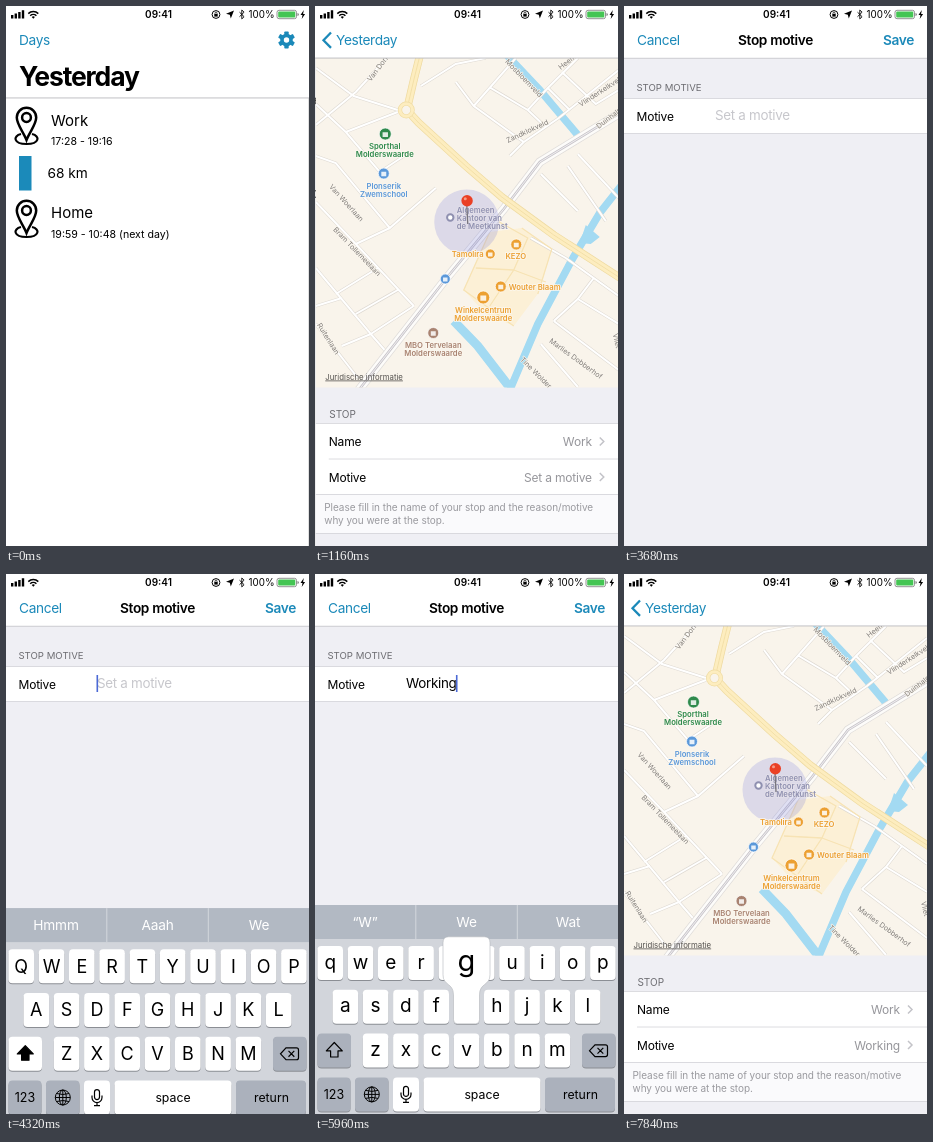
Animation, 303 px wide and 540 px high, one loop 7.88 s. Source, as an HTML page:

```html
<!DOCTYPE html>
<html lang="en">
<head>
<meta charset="utf-8">
<title>Stop motive</title>
<style>
html, body { margin: 0; width: 100%; height: 100%; overflow: hidden; background: #fff; }
svg { display: block; }
#stage { width: 100vw; height: 100vh; }
text { font-family: Inter, "Liberation Sans", sans-serif; font-optical-sizing: none; white-space: pre; }
.bar { font-size: 13.7px; letter-spacing: -.35px; fill: #1b89b9; }
.bold { font-weight: 600; }
.cell { font-size: 12px; letter-spacing: -.2px; }
.field { font-size: 13.4px; letter-spacing: -.3px; }
.head { font-size: 10px; fill: #6d6d72; }
.note { font-size: 10px; letter-spacing: -.05px; fill: #9a9a9f; }
.grey { fill: #96969b; }
.time { font-size: 10.6px; }
.poi { font-size: 7.7px; font-weight: 600; stroke: #fbf7ef; stroke-width: 1.6px; paint-order: stroke; }
.street { font-size: 7.2px; fill: #807c78; stroke: #fbf7ef; stroke-width: 1.4px; paint-order: stroke; }
.mid { text-anchor: middle; }
.end { text-anchor: end; }
</style>
</head>
<body>
<svg id="stage" viewBox="0 0 303 540">
  <rect width="303" height="540" fill="#fff"/>

  <g id="list">
    <g id="pins"></g>
    <rect x="13" y="150" width="12.5" height="34.5" fill="#1b8aba"/>
    <text x="45" y="119.5" font-size="15">Work</text>
    <text x="45" y="138.5" class="time">17:28 - 19:16</text>
    <text x="41.5" y="172" font-size="13.7">68 km</text>
    <text x="45" y="212" font-size="15">Home</text>
    <text x="45" y="231.5" class="time">19:59 - 10:48 (next day)</text>
  </g>

  <g id="detail">
    <rect x="-1" y="52" width="1" height="488" fill="#000" opacity=".12"/>
    <rect y="52" width="303" height="488" fill="#efeff4"/>
    <svg id="map" y="52" width="303" height="329.500" viewBox="0 52 303 329.500"></svg>
    <text x="13.500" y="411.500" class="head">STOP</text>
    <rect y="417" width="303" height="71.500" fill="#fff"/>
    <rect y="488.500" width="303" height="38.500" fill="#fafafc"/>
    <path d="M0 417.500H303M13 453H303M0 488.500H303M0 527.500H303" stroke="#d3d3d8" stroke-width=".8"/>
    <text x="13" y="440" class="cell">Name</text>
    <text x="13" y="475.500" class="cell">Motive</text>
    <text x="276" y="440" class="cell grey end">Work</text>
    <text x="276" y="475.500" class="cell grey end" id="motive"></text>
    <path d="M284 431.500l4 4-4 4M284 467l4 4-4 4" fill="none" stroke="#c3c3c8" stroke-width="1.500"/>
    <text x="8.500" y="505" class="note">Please fill in the name of your stop and the reason/motive</text>
    <text x="8.500" y="517.500" class="note">why you were at the stop.</text>
  </g>

  <g id="nav">
    <rect id="navBg" width="303" height="92" fill="#fff"/>
    <rect id="navLine" y="91.500" width="303" height=".9" fill="#b9b9bd"/>
    <g id="rootItems">
      <text x="13" y="39" class="bar">Days</text>
      <g id="gear" fill="#1b89b9"></g>
    </g>
    <text id="large" font-size="26.500" font-weight="700" letter-spacing="-1.150">Yesterday</text>
    <path id="chevron" d="M16 26.500l-7.500 7.700 7.500 7.700" fill="none" stroke="#1b89b9" stroke-width="2.300"/>
    <text id="back" class="bar">Yesterday</text>
  </g>

  <g id="modal">
    <rect width="303" height="540" fill="#efeff4"/>
    <rect width="303" height="52" fill="#fff"/>
    <rect y="51.800" width="303" height=".8" fill="#c4c4c9"/>
    <text x="13" y="39" class="bar">Cancel</text>
    <text x="151.500" y="39" class="bar bold mid" style="fill:#000">Stop motive</text>
    <text x="290" y="39" class="bar bold end">Save</text>
    <text x="12.500" y="85" class="head" style="font-size:9.600px">STOP MOTIVE</text>
    <rect y="92.500" width="303" height="35" fill="#fff"/>
    <path d="M0 92.500H303M0 127.500H303" stroke="#d3d3d8" stroke-width=".8"/>
    <text x="12.500" y="114.500" class="cell">Motive</text>
    <text x="91" y="114" class="field" id="hint" fill="#c7c7cc">Set a motive</text>
    <text x="91" y="114" class="field" id="typed"></text>
    <rect id="caret" y="101" width="1.600" height="17" fill="#4b69d6"/>
  </g>

  <g id="board">
    <rect y="331" width="303" height="209" fill="#d2d5db"/>
    <rect y="331" width="303" height="34" fill="#b2b9c3"/>
    <path d="M100.800 331V365M202.300 331V365" stroke="#d3d7dd"/>
    <g id="tips"></g>
    <g id="upper"></g>
    <g id="lower"></g>
    <g id="fixed"></g>
    <g id="bubble">
      <path d="M-18 -70H18Q23.500 -70 23.500 -64V-32C23.500 -21 13 -24 13 -12V13Q13 17 9 17H-9Q-13 17 -13 13V-12C-13 -24 -23.500 -21 -23.500 -32V-64Q-23.500 -70 -18 -70Z" transform="translate(0 44)" fill="none"/>
      <path d="M-18 -26H18Q23.500 -26 23.500 -20V12C23.500 23 13 20 13 32V57Q13 61 9 61H-9Q-13 61 -13 57V32C-13 20 -23.500 23 -23.500 12V-20Q-23.500 -26 -18 -26Z" transform="translate(0 -44)" fill="#fff" stroke="#b4b7bd" stroke-width=".6"/>
      <text id="bubbleText" y="-36" class="mid" font-size="29"></text>
    </g>
  </g>

  <g id="status">
    <path d="M5 9h2.400v3.500H5zM8.600 7.500H11v5H8.600zM12.200 6h2.400v6.500h-2.400zM15.800 4.300h2.400v8.200h-2.400z"/>
    <path d="M22.300 7.600a7.200 7.200 0 0 1 10 0M24.200 9.700a4.500 4.500 0 0 1 6.200 0" fill="none" stroke="#000" stroke-width="1.500"/>
    <path d="M25.700 11a2.400 2.400 0 0 1 3.200 0L27.300 12.800z"/>
    <text x="152.500" y="12" font-size="10" class="bold mid">09:41</text>
    <circle cx="210" cy="8.500" r="3.900" fill="none" stroke="#000" stroke-width="1"/>
    <path d="M208.300 8h3.400v2.600h-3.400z"/>
    <path d="M209 8V7.200a1 1 0 0 1 2 0V8" fill="none" stroke="#000" stroke-width=".7"/>
    <path d="M228 4.500l-3.200 8-1-3.800-3.800-1z"/>
    <path d="M233.500 6.200l4.600 4.500-2.300 2.200V4l2.300 2.200-4.600 4.500" fill="none" stroke="#000" stroke-width=".9"/>
    <text x="268.500" y="12" font-size="9.800" class="end">100%</text>
    <rect x="271" y="4.300" width="19.500" height="8.400" rx="2" fill="none" stroke="#777" stroke-width=".8"/>
    <rect x="272.200" y="5.500" width="17.100" height="6" rx="1" fill="#44c553"/>
    <path d="M291.500 7v3q1.300-.4 1.300-1.500t-1.300-1.500" fill="#777"/>
    <path d="M297.800 4l-3.300 5h2l-.8 4 3.400-5h-2z"/>
  </g>
</svg>

<script>
const LOOP = 7880, PUSH = 550, PRESENT = 2616, FOCUS = 3860, BLINK = 3958, DISMISS = 7010, HOLD = 110;
const presses = [["W", 5100], ["o", 5330], ["r", 5470], ["k", 5600], ["i", 5720], ["n", 5830], ["g", 5920]];
const $ = id => document.getElementById(id);
const move = (id, x, y, s = 1) => $(id).setAttribute("transform", `translate(${x} ${y}) scale(${s})`);
const show = (id, on) => $(id).setAttribute("opacity", +on);
const clamp = v => Math.max(0, Math.min(1, v));
const label = (x, y, s, cls, more = "") => `<text x="${x}" y="${y}" class="${cls}" ${more}>${s}</text>`;
const line = (d, w, c, more = "") => `<path d="${d}" fill="none" stroke="${c}" stroke-width="${w}" ${more}/>`;

// Remaining distance of a critically damped spring, 1 to 0
function rest(ms) {
  const a = Math.max(0, ms) * 0.0134;
  return (1 + a) * Math.exp(-a);
}

function drawList() {
  $("pins").innerHTML = [0, 93].map(y => `<g transform="translate(20.500 ${101 + y})" fill="none" stroke="#000" stroke-width="2.500">
    <path d="M0 33C-3 25-9.700 17.500-9.700 10.500a9.700 9.700 0 0 1 19.400 0C9.700 17.500 3 25 0 33Z"/>
    <circle cy="10.500" r="4.400"/>
    <path d="M-5.500 27C-14 29-13 37 0 37S14 29 5.500 27" stroke-width="2.200"/></g>`).join("");
  let teeth = "";
  for (let a = 0; a < 360; a += 60)
    teeth += `<rect x="-2.200" y="-8.500" width="4.400" height="5" rx=".8" transform="rotate(${a})"/>`;
  $("gear").innerHTML = `<g transform="translate(280.500 34)">${teeth}<circle r="4.500" fill="none" stroke="#1b89b9" stroke-width="3.600"/></g>`;
}

function drawMap() {
  const streets = "M0 119L40 86 71 52M0 62L38 90 82 104M0 98L30 126 82 106M30 126L64 166 88 150" +
    "M0 150L20 157 74 222 120 182M0 196L40 238 98 300M40 238L74 222M0 262L55 328 98 300M0 318L42 372" +
    "M0 300L26 292M26 340L55 328 74 350M62 262L20 288M82 284L40 308" +
    "M105 80L140 58 170 52M140 76L158 100 208 136 243 112 303 64M158 100L200 52M175 82L212 104 232 82 262 52" +
    "M212 104L230 121M232 82L254 104M246 66L280 98 303 84M194 150L208 136M262 148L303 192M252 160L290 215" +
    "M225 168L262 205M215 232L250 252 303 290M238 315L303 364M225 338L262 381M262 293L303 318M278 272L262 293 238 315";
  const canals = "M190 48L224 84 262 129M306 179L284 207 256 254 222 318 194 384";
  const main = "M104 50L98 74 91 104 103 117 150 160 186 191 238 229 306 273";
  const rail = "M43 384L130 273 188 203 224 156 306 106";
  let s = `<rect y="52" width="303" height="330" fill="#f9f4eb"/>
    <path d="M174 226L206 222 236 243 222 288 198 320 170 308 148 284Z" fill="#fcf0d6"/>`;
  s += line(canals, 7.500, "#a3daf2") + line("M138 315L162 340 196 384", 9, "#a3daf2") +
    `<path d="M264 237l6-18 14 12-9 7z" fill="#a3daf2"/>`;
  s += line(streets, 3.200, "#dfdad3") + line(streets, 2, "#fff");
  s += line("M180 214L212 232 198 264 174 300M198 264L230 276M160 262L198 264M174 226L148 284 198 320M206 222L236 243 222 288", 1.300, "#f7e3b4");
  s += line(rail, 9, "#e0ddda") + line(rail, 7.500, "#fdfcfa") + line(rail, 2.600, "#c9c6cb") + line(rail, 1, "#f1eff1");
  s += line(main, 8, "#efdba2") + line(main, 6.500, "#fdedbf") + line(main, .8, "#f0dca4");
  s += `<circle cx="90.500" cy="104" r="6.300" fill="#f9f4eb" stroke="#efdba2" stroke-width="4.300"/>
    <circle cx="90.500" cy="104" r="6.300" fill="none" stroke="#fdedbf" stroke-width="3"/>`;

  const names = [[55, 76, -53, "Van Dorl"], [13, 181, 48, "Van Woerlaan"], [17, 224, 46, "Bram Tollemeelaan"],
    [1, 319, 58, "Ruitenlaan"], [189, 56, 46, "Mosbloemveld"], [245, 64, -38, "Heemst"],
    [265, 101, -33, "Vlinderkelkveld"], [192, 137, -25, "Zandklokveld"], [283, 123, -38, "Duinhalm"],
    [233, 336, 36, "Marlies Dobberhof"], [204, 354, 45, "Tine Wolder"], [297, 328, 78, "Vliet"]];
  for (const [x, y, a, n] of names) s += label(0, 0, n, "street", `transform="translate(${x} ${y}) rotate(${a})"`);

  const dot = (x, y, r, c) => `<circle cx="${x}" cy="${y}" r="${r}" fill="${c}" stroke="#fff" stroke-width=".7"/>
    <path d="M${x - r * .45} ${y - r * .3}h${r * .9}v${r * .8}h${-r * .9}z" fill="#fff" opacity=".85"/>`;
  const poi = (x, y, c, rows, cls = "mid") => rows.map((n, i) => label(x, y + i * 8.300, n, "poi " + cls, `fill="${c}"`)).join("");
  const green = "#2f8a4c", blue = "#5b98d9", orange = "#eca032", brown = "#a98371", slate = "#8f90b0";
  s += `<circle cx="151" cy="216" r="32.500" fill="#7476d8" opacity=".22"/>`;
  s += dot(69.500, 128, 6, green) + poi(69, 143, green, ["Sporthal", "Molderswaarde"]);
  s += dot(68, 167.500, 5.500, blue) + poi(68, 182.500, blue, ["Plonserik", "Zwemschool"]);
  s += `<circle cx="134.500" cy="211.500" r="3.200" fill="#fff" stroke="${slate}" stroke-width="2"/>`;
  s += `<g style="--halo:0" stroke-opacity=".25">${poi(141, 206.500, slate, ["Algemeen", "Kantoor van", "de Meetkunst"], "")}</g>`;
  s += dot(174.500, 248, 5, orange) + poi(168, 251, orange, ["Tamolira"], "end");
  s += dot(200.500, 238.500, 5.500, orange) + poi(200, 253, orange, ["KEZO"]);
  s += dot(185, 280.500, 5.500, orange) + poi(193, 283.500, orange, ["Wouter Blaam"], "");
  s += dot(167.500, 291.500, 6.500, orange) + poi(167.500, 306.500, orange, ["Winkelcentrum", "Molderswaarde"]);
  s += dot(117.500, 327, 5.500, brown) + poi(117.500, 341.500, brown, ["MBO Tervelaan", "Molderswaarde"]);
  s += dot(129.500, 273, 5, blue);
  s += line("M151 199L152 218", 1.300, "#77747c") +
    `<circle cx="151.300" cy="194.800" r="5.700" fill="#ea4025"/><circle cx="149.500" cy="192.800" r="1.500" fill="#f79a86"/>`;
  s += label(9.500, 373.500, "Juridische informatie", "", `font-size="7.800" fill="#55524f" text-decoration="underline"`);
  $("map").innerHTML = s;
}

const rows = ["qwertyuiop", "asdfghjkl", "zxcvbnm"], starts = [15.2, 30.3, 60.6];
const keyAt = i => 389 + 43.8 * i;

function cap(x, y, w, fill) {
  const r = (dy, c) => `<rect x="${x}" y="${y - 17 + dy}" width="${w}" height="34" rx="4" fill="${c}"/>`;
  return r(1, "#8b8e94") + r(0, fill);
}

function keys(upper) {
  let s = "";
  rows.forEach((row, i) => [...row].forEach((ch, j) => {
    const x = starts[i] + j * 30.3, y = keyAt(i);
    s += cap(x - 12.8, y, 25.6, "#fff") +
      label(x, y + (upper ? 6.500 : 5.500), upper ? ch.toUpperCase() : ch, "mid", `font-size="${upper ? 18 : 19}"`);
  }));
  s += cap(2.500, keyAt(2), 33.500, upper ? "#fff" : "#abb1bc");
  s += `<path d="M19.300 468.500l8 8.300h-4.300v6.200h-7.400v-6.200h-4.300z" fill="${upper ? "#000" : "none"}" stroke="#000" stroke-width="1.200" stroke-linejoin="round"/>`;
  return s;
}

function drawBoard() {
  const grey = "#abb1bc", y = keyAt(3);
  $("upper").innerHTML = keys(true);
  $("lower").innerHTML = keys(false);
  $("fixed").innerHTML = cap(267, keyAt(2), 33.500, grey) +
    line("M280 470.800H290.500Q292.500 470.800 292.500 472.800V480.600Q292.500 482.600 290.500 482.600H280L274.500 476.700ZM282.500 473.800l5.800 5.800M288.300 473.800l-5.800 5.800", 1.2, "#000") +
    cap(2.500, y, 33, grey) + label(19, y + 4.500, "123", "mid", `font-size="12.500"`) +
    cap(40, y, 33.500, grey) + `<g transform="translate(56.800 ${y})" fill="none" stroke="#000" stroke-width="1">
      <circle r="7.500"/><ellipse rx="3.500" ry="7.500"/><path d="M0-7.500V7.500M-7.500 0H7.500M-6.300-4Q0-2 6.300-4M-6.300 4Q0 2 6.300 4"/></g>` +
    cap(78, y, 26, "#fff") + `<g transform="translate(91 ${y})" fill="none" stroke="#000" stroke-width="1.200">
      <rect x="-2.500" y="-8" width="5" height="10" rx="2.500"/><path d="M-5-2V0a5 5 0 0 0 10 0V-2M0 5V8M-3 8H3"/></g>` +
    cap(108.500, y, 117, "#fff") + label(167, y + 4.300, "space", "mid", `font-size="12.300"`) +
    cap(230, y, 70, grey) + label(265.500, y + 4.300, "return", "mid", `font-size="12.300"`);
  $("tips").innerHTML = [50, 151.5, 253].map(x => label(x, 352.500, "", "mid", `font-size="13.700" letter-spacing="-.2" fill="#fff"`)).join("");
}

function caretAlpha(t) {
  if (t < BLINK) return 0;
  const last = presses[presses.length - 1][1];
  if (t >= presses[0][1] && t < last) return 1;
  const p = (t - (t < last ? BLINK : last)) % 1000;
  return p < 500 ? 1 : p < 880 ? clamp(1 - (p - 500) / 180) : (p - 880) / 120;
}

function drawNav(t) {
  const r = rest(t - PUSH), p = 1 - r, h = 52 + 40 * r;
  move("list", -91 * p, -40 * p);
  move("detail", 303 * r, 0);
  $("navBg").setAttribute("height", h);
  $("navLine").setAttribute("y", h - .5);
  const x = 13 + 8 * p, y = 80 - 41 * p;
  move("large", x, y, 1 - .49 * p);
  move("back", x, y, 1.96 - .96 * p);
  show("rootItems", clamp(1 - 2 * p));
  show("large", clamp(1 - 1.6 * p));
  show("back", clamp(1.6 * p - .6));
  show("chevron", clamp(1.6 * p - .6));
  $("motive").textContent = t < DISMISS ? "Set a motive" : "Working";
}

function drawModal(t) {
  const out = 1 - rest(t - DISMISS);
  move("modal", 0, 540 * (t < DISMISS ? rest(t - PRESENT) : out));
  move("board", 0, 210 * (t < DISMISS ? rest(t - FOCUS) : out));
  const word = presses.filter(k => t >= k[1]).map(k => k[0]).join("");
  $("typed").textContent = word;
  show("hint", !word);
  show("upper", !word);
  show("lower", !!word);
  $("caret").setAttribute("x", 90.500 + (word ? $("typed").getComputedTextLength() : 0));
  show("caret", caretAlpha(t));
  const tips = word ? ["“W”", "We", "Wat"] : ["Hmmm", "Aaah", "We"];
  tips.forEach((s, i) => $("tips").children[i].textContent = s);

  const hit = presses.find(k => t >= k[1] && t < k[1] + HOLD);
  show("bubble", !!hit);
  if (hit) {
    const ch = hit[0].toLowerCase(), i = rows.findIndex(r => r.includes(ch));
    move("bubble", starts[i] + 30.3 * rows[i].indexOf(ch), keyAt(i));
    $("bubbleText").textContent = hit[0];
  }
}

function frame() {
  const t = performance.now() % LOOP;
  drawNav(t);
  drawModal(t);
  requestAnimationFrame(frame);
}

drawList();
drawMap();
drawBoard();
frame();
</script>
</body>
</html>
```
